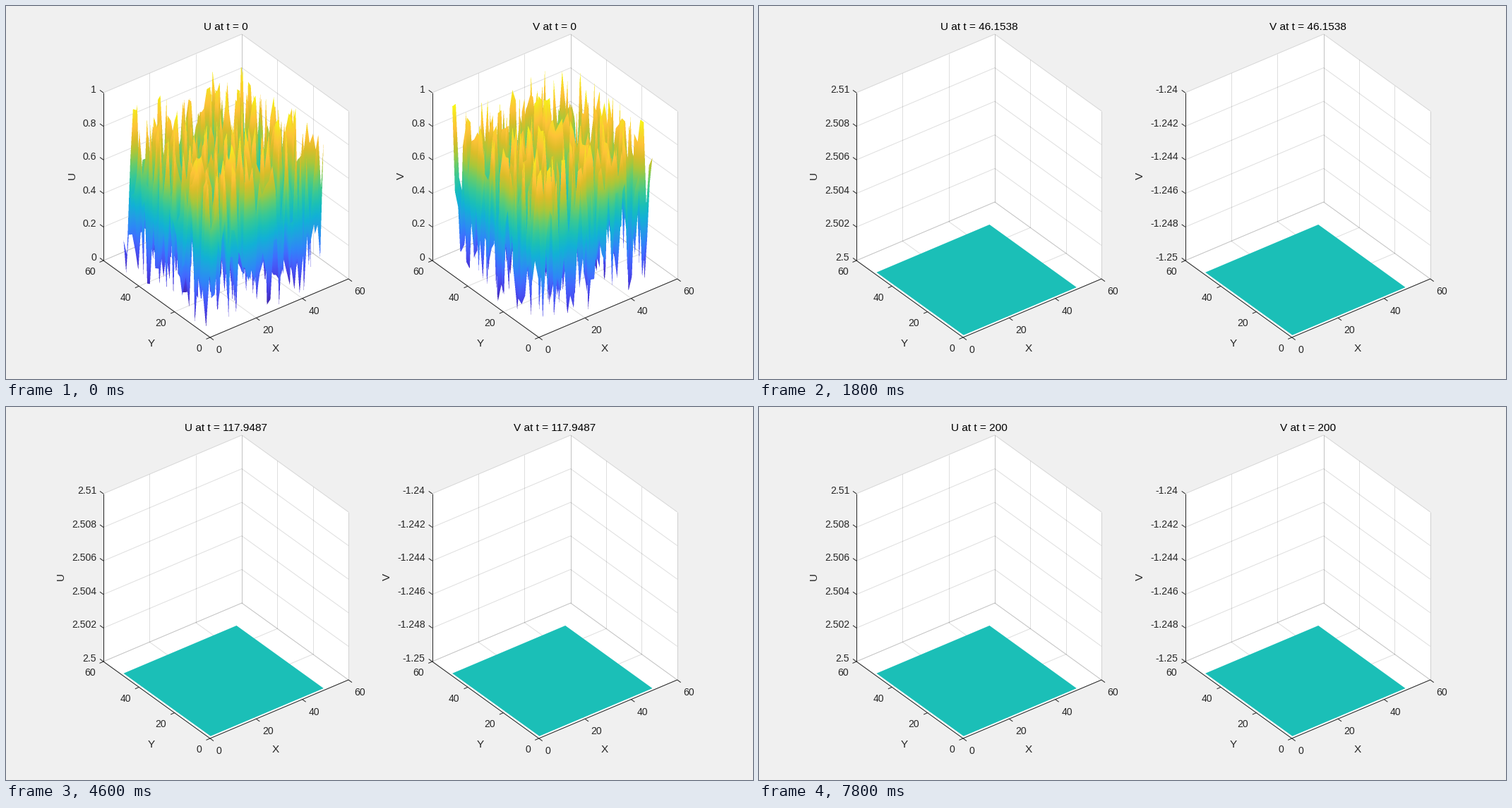
These frames come from a looping animation (1058 px wide and 529 px high, 8000 ms). A matplotlib script:

```python
import math

import matplotlib.pyplot as plt
import numpy as np
from matplotlib.animation import FuncAnimation
from matplotlib.collections import LineCollection
from matplotlib.colors import LinearSegmentedColormap

W, H, DPI = 1058, 529, 64
FRAMES, STEP_MS, T_END = 40, 200, 200
N, SS = 34, 3                      # grid points per side, supersampling
LOW, HIGH = 1, 50                  # extent of the surface in x and y
PT = 72 / DPI                      # points per pixel
INK = "#262626"
TICKS = range(0, 61, 20)
LEVELS = np.linspace(0, 1, 6)

# evenly spaced key colours, blue to yellow
SHADES = LinearSegmentedColormap.from_list("shades", (
    "#3e26a8 #4639da #4852f4 #416cfe #2e87f7 #239de5 #12b1d6 #1abfb8 "
    "#37c897 #68cc6b #abc739 #dcbd29 #fec338 #f6dc26 #f9fb15").split())

plt.rcParams["font.family"] = "Liberation Sans"
plt.rcParams["axes.unicode_minus"] = False


def project(x, y, z, ox):
    """Orthographic view; x and y run 0..60, z runs 0..1."""
    return (ox + 196 * x / 60 - 151 * y / 60,
            470 - 83 * x / 60 - 109 * y / 60 - 238 * z)


def fill_triangle(pts, depth, vals, zbuf, vbuf):
    (x0, y0), (x1, y1), (x2, y2) = pts
    area = (x1 - x0) * (y2 - y0) - (x2 - x0) * (y1 - y0)
    if abs(area) < 1e-9:
        return
    left, top = np.floor(pts.min(axis=0)).astype(int)
    right, bottom = np.ceil(pts.max(axis=0)).astype(int)
    gx = np.arange(left, right)[None, :] + .5
    gy = np.arange(top, bottom)[:, None] + .5
    b = ((gx - x0) * (y2 - y0) - (x2 - x0) * (gy - y0)) / area
    c = ((x1 - x0) * (gy - y0) - (gx - x0) * (y1 - y0)) / area
    a = 1 - b - c
    d = a * depth[0] + b * depth[1] + c * depth[2]
    box = np.s_[top:bottom, left:right]
    hit = (a >= -1e-9) & (b >= -1e-9) & (c >= -1e-9) & (d < zbuf[box])
    zbuf[box][hit] = d[hit]
    vbuf[box][hit] = (a * vals[0] + b * vals[1] + c * vals[2])[hit]


def render_noise(origins, seed):
    """Depth-buffered image of one random surface per panel."""
    rng = np.random.default_rng(seed)
    zbuf = np.full((H * SS, W * SS), np.inf)
    vbuf = np.zeros_like(zbuf)
    side = np.linspace(LOW, HIGH, N)
    gx, gy = (g.ravel() for g in np.meshgrid(side, side, indexing="ij"))
    depth = gx + gy
    for ox in origins:
        vals = rng.random(N * N)
        pts = np.stack(project(gx, gy, vals, ox), axis=1) * SS
        for i in range(N - 1):
            for j in range(N - 1):
                a = i * N + j
                b, c, d = a + N, a + N + 1, a + 1
                for tri in ([a, b, c], [a, c, d]):
                    fill_triangle(pts[tri], depth[tri], vals[tri], zbuf, vbuf)
    rgba = SHADES(vbuf) * np.isfinite(zbuf)[..., None]
    rgba = rgba.reshape(H, SS, W, SS, 4).mean(axis=(1, 3))
    rgba[..., :3] /= np.maximum(rgba[..., 3:], 1e-9)
    return np.clip(rgba, 0, 1)


def label(x, y, s, px=14, ha="center", va="baseline", color=INK, **kw):
    return ax.text(x, y, s, fontsize=px * PT, ha=ha, va=va, color=color,
                   zorder=5, **kw)


def add_lines(segs, alpha, z):
    ax.add_collection(LineCollection(segs, colors=INK, alpha=alpha,
                                     linewidths=PT, zorder=z))


def draw_box(ox):
    def p(x, y, z):
        return project(x, y, z, ox)

    hull = [p(0, 60, 0), p(0, 60, 1), p(60, 60, 1),
            p(60, 0, 1), p(60, 0, 0), p(0, 0, 0)]
    ax.fill(*zip(*hull), color="white", lw=0, zorder=1)

    grid = []
    rules = [(p(0, 0, 0), p(60, 0, 0)), (p(0, 0, 0), p(0, 60, 0)),
             (p(0, 60, 0), p(0, 60, 1))]
    for t in TICKS:
        grid += [(p(t, 0, 0), p(t, 60, 0)), (p(0, t, 0), p(60, t, 0)),
                 (p(t, 60, 0), p(t, 60, 1)), (p(60, t, 0), p(60, t, 1))]
        x, y = p(t, 0, 0)
        rules.append(((x, y), (x + 5, y + 3.6)))
        label(x + 8.7, y + 22, str(t), ha="left")
        x, y = p(0, t, 0)
        rules.append(((x, y), (x - 5.5, y + 2.4)))
        label(x - 11.5, y + 20.4, str(t), ha="right")
    for t in LEVELS:
        grid += [(p(0, 60, t), p(60, 60, t)), (p(60, 0, t), p(60, 60, t))]
        x, y = p(0, 60, t)
        rules.append(((x, y), (x - 5, y - 3.6)))
    add_lines(grid, .15, 2)
    add_lines(rules, 1, 4)

    label(ox + 93, 490, "X", 15.4)
    label(ox - 83, 483, "Y", 15.4)


def z_axis(name, ox, low, high, gap):
    """Tick labels and the upright axis name, gap pixels left of the axis."""
    out = []
    for t in LEVELS:
        x, y = project(0, 60, t, ox)
        out.append(label(x - 10, y, f"{low + (high - low) * t:.6g}", ha="right"))
    out.append(label(x - gap, 241, name, 15.4, va="center", rotation=90))
    return out


def num_text(t):
    """Four decimals at most, trailing zeros dropped."""
    if t == 0:
        return "0"
    return f"{t:.{math.floor(math.log10(t)) + 5}g}"


fig = plt.figure(figsize=(W / DPI, H / DPI), dpi=DPI, facecolor="#f0f0f0")
ax = fig.add_axes([0, 0, 1, 1])
ax.axis("off")

# name, screen x of the front corner, settled z limits, axis name gap
panels = [("U", 289, 2.5, 2.51, 60), ("V", 754.7, -1.25, -1.24, 64)]
rough, flat, titles = [], [], {}
for name, ox, low, high, gap in panels:
    draw_box(ox)
    rough += z_axis(name, ox, 0, 1, 44)
    flat += z_axis(name, ox, low, high, gap)
    corners = [project(x, y, 0, ox) for x, y in
               ((LOW, LOW), (HIGH, LOW), (HIGH, HIGH), (LOW, HIGH))]
    flat += ax.fill(*zip(*corners), color=SHADES(.5), lw=0, zorder=3)
    titles[name] = label(ox + 22.5, 34, "", 15.4, color="black")

noise = render_noise([panel[1] for panel in panels], seed=7)
rough.append(ax.imshow(noise, extent=(0, W, H, 0), aspect="auto",
                       interpolation="nearest", zorder=3))
ax.set_xlim(0, W)
ax.set_ylim(H, 0)


def update(i):
    for artist in rough:
        artist.set_visible(i == 0)
    for artist in flat:
        artist.set_visible(i > 0)
    for name, title in titles.items():
        title.set_text(f"{name} at t = {num_text(T_END * i / (FRAMES - 1))}")
    return []


anim = FuncAnimation(fig, update, frames=FRAMES, interval=STEP_MS,
                     repeat=True, repeat_delay=0, blit=False)
plt.show()
```
